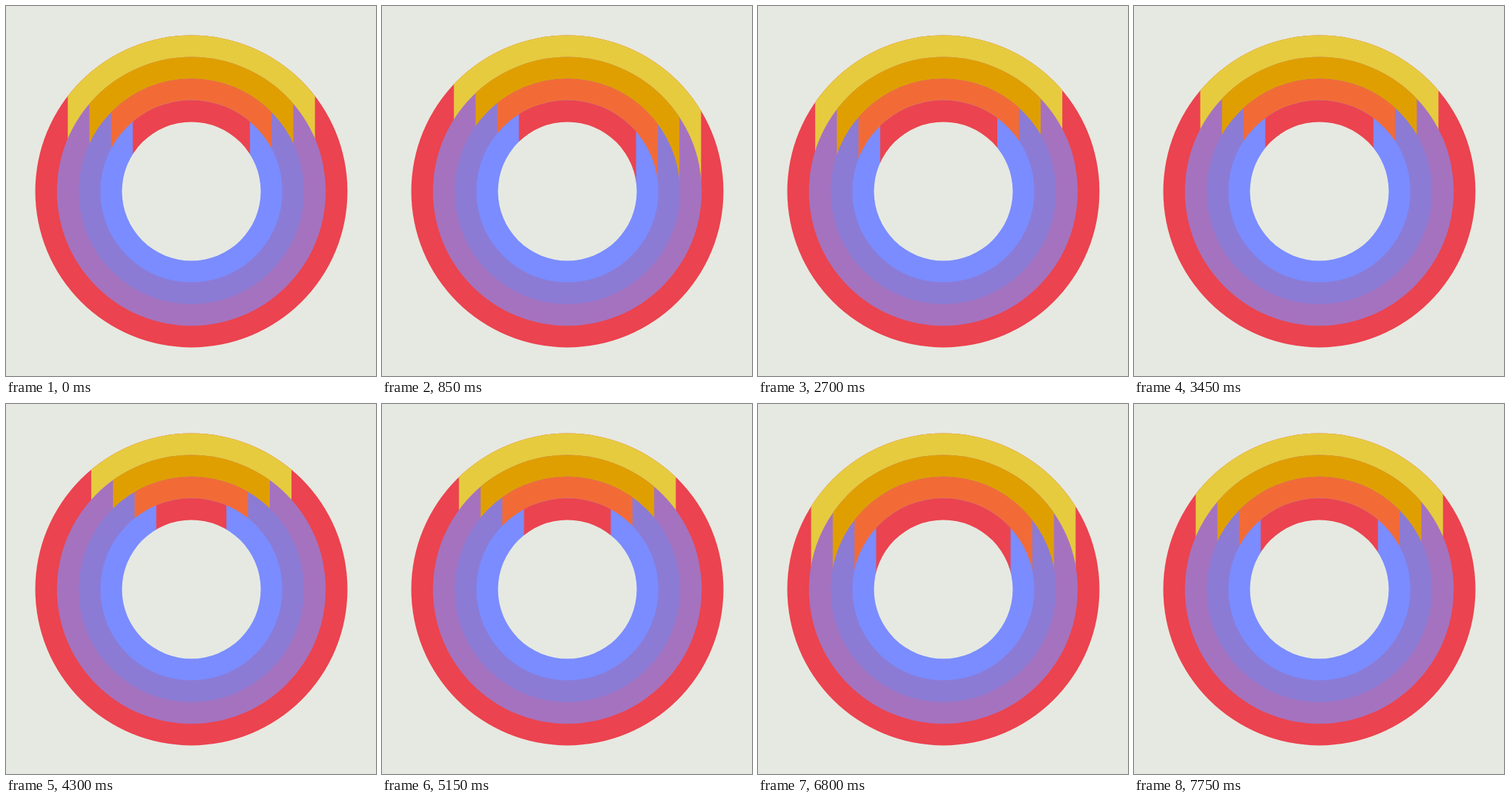
These frames come from a looping animation (512x512 px, 7.8 s). An HTML page with a canvas:

```html
<!DOCTYPE html>
<html lang="en">
<head>
<meta charset="utf-8">
<title>Rings</title>
<style>
  html, body { margin: 0; width: 100%; height: 100%; overflow: hidden; background: #e6e9e1; }
  canvas { display: block; width: 512px; height: 512px; }
</style>
</head>
<body>
<canvas id="stage" width="512" height="512"></canvas>
<script>
const ctx = document.getElementById('stage').getContext('2d');

const LOOP = 7800, STEP = 50;
const CENTER = 256.5, OUTER = 216, BAND = 30, HALF = 171;
const PAPER = '#e6e9e1';
const lower = ['#eb434f', '#a572bf', '#8b7bd5', '#7a8cff'];
const upper = ['#e6cb3e', '#e09f00', '#f26b37', '#eb434f'];

// [time, value] pairs, eased to a rest at each one
const shift = [[0, 0], [775, 14.2], [2325, -12], [3110, 0], [LOOP, 0]];
const spread = [[0, 0], [3110, 0], [4325, -32.5], [6800, 12], [LOOP, 0]];

function valueAt(keys, time) {
  const i = keys.findIndex(key => key[0] > time);
  const [t0, v0] = keys[i - 1], [t1, v1] = keys[i];
  const u = (time - t0) / (t1 - t0);
  return v0 + (v1 - v0) * u * u * (3 - 2 * u);
}

function disc(radius, color) {
  ctx.fillStyle = color;
  ctx.beginPath();
  ctx.arc(CENTER, CENTER, radius, 0, Math.PI * 2);
  ctx.fill();
}

function draw(time) {
  const middle = CENTER + valueAt(shift, time);
  const half = HALF + valueAt(spread, time);
  ctx.fillStyle = PAPER;
  ctx.fillRect(0, 0, 512, 512);
  lower.forEach((color, i) => {
    const radius = OUTER - i * BAND, reach = half - i * BAND;
    disc(radius, color);
    ctx.save();
    ctx.beginPath();
    ctx.rect(middle - reach, 0, reach * 2, CENTER);
    ctx.clip();
    disc(radius, upper[i]);
    ctx.restore();
  });
  disc(OUTER - lower.length * BAND, PAPER);
}

const start = performance.now();
function tick() {
  const time = (performance.now() - start) % LOOP;
  draw(Math.floor(time / STEP) * STEP);
  requestAnimationFrame(tick);
}
tick();
</script>
</body>
</html>
```
